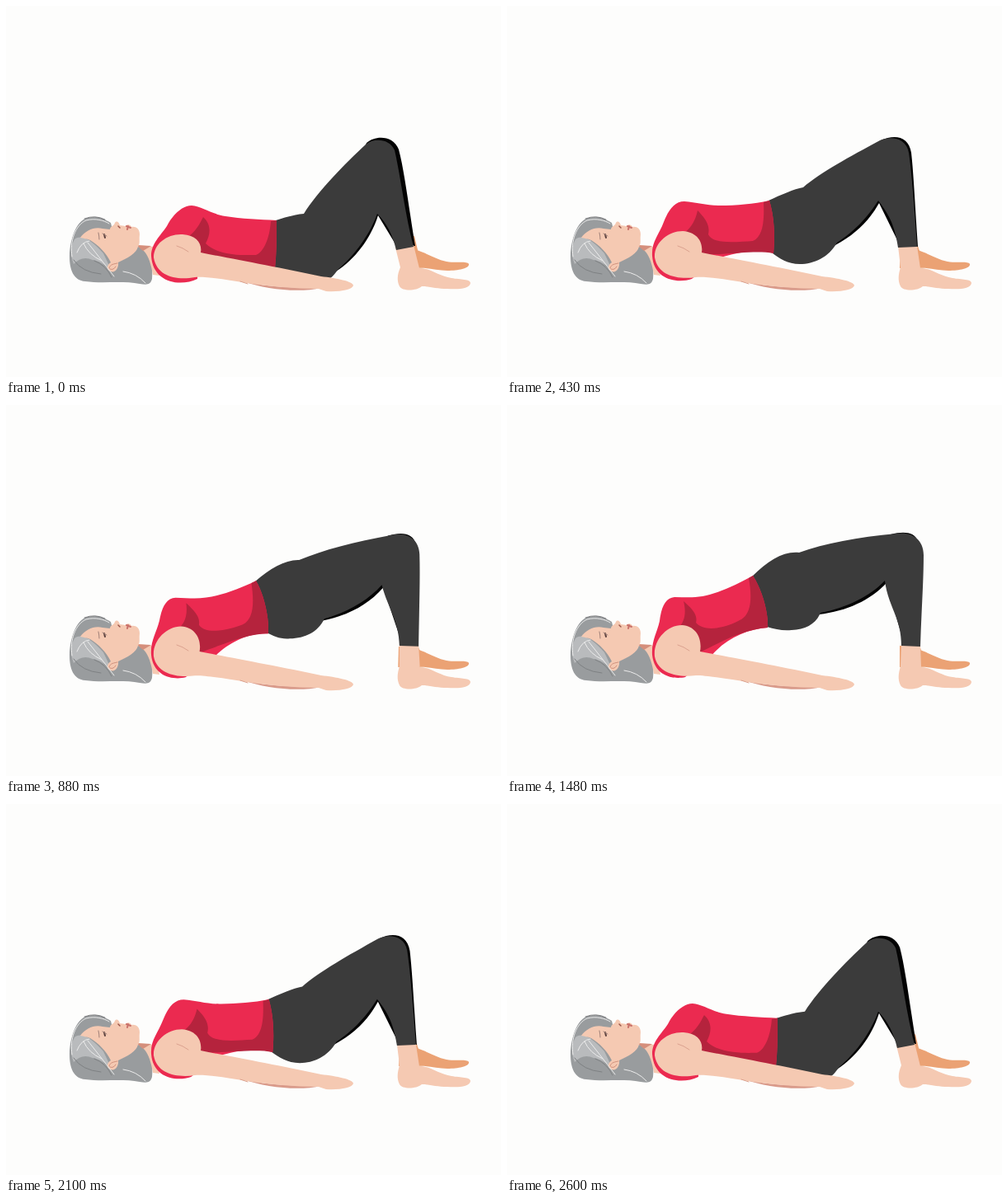
These frames come from a looping animation (600 by 450 pixels, 2.62 s). An HTML page:

```html
<!DOCTYPE html>
<html lang="en">
<head>
<meta charset="utf-8">
<title>Bridge exercise</title>
<style>
html, body { margin: 0; width: 100%; height: 100%; overflow: hidden; background: #fdfdfc; }
svg { display: block; width: 600px; height: 450px; }
.line { fill: none; stroke-linecap: round; }
</style>
</head>
<body>
<svg viewBox="0 0 600 450">
  <!-- far leg -->
  <g fill="#eba274">
    <path id="farAnkle"/>
    <path d="M497 296C507 298 520 307 534 310C546 312 559 309 561 313C562 318 549 321 535 321C522 321 511 317 499 318Z"/>
  </g>
  <path id="farLeg" fill="#030303"/>

  <!-- near leg -->
  <path id="foot" fill="#f5c9b2"/>
  <path id="pants" fill="#3b3b3b"/>

  <!-- hair and neck -->
  <path fill="#999c9e" d="M94 259C104 254 117 256 127 263L130 275L158 292L172 293C177 304 178 318 177 331C175 339 170 338 162 337C141 333 116 337 96 334C82 333 77 320 77 304C77 287 83 266 94 259Z"/>
  <path fill="#b9bbbd" d="M83 283C93 276 104 285 118 300L127 319C119 314 113 309 105 308C96 304 89 306 82 313C78 302 78 292 83 283Z"/>
  <path fill="#f5c9b2" d="M160 290L179 292L186 327L178 326C176 314 173 303 167 297Z"/>
  <path fill="#d58f7c" d="M158 290L176 291L166 297Z"/>

  <!-- torso -->
  <path id="top" fill="#eb2a50"/>
  <path id="shade" fill="#b5233d"/>

  <!-- arm -->
  <path fill="#d99a8a" d="M288 334C320 342 350 341 382 342C355 348 315 344 288 334Z"/>
  <path id="arm" fill="#f5c9b2"/>
  <path class="line" stroke="#dba28f" d="M207 291Q214 293 221 298M284 334L293 337"/>

  <!-- face -->
  <path fill="#f5c9b2" d="M90 281C96 272 108 267 117 270L126 271C126 267 131 267 132 263C134 260 137 262 138 266L145 267C147 264 151 265 152 268C157 267 162 270 162 277C161 284 163 287 160 292C158 300 147 306 136 311C137 318 132 324 127 322C121 320 122 314 127 311C122 300 112 290 102 284C97 282 94 282 90 281Z"/>
  <path class="line" stroke="#d0907c" d="M125 318C126 313 131 313 135 312M126 319Q130 321 133 316"/>
  <path class="line" stroke="#5f4440" stroke-width="2" d="M119 277L120 281"/>
  <path class="line" stroke="#a08078" d="M112 275Q113 279 113 283M117 276L122 279"/>
  <path class="line" stroke="#9a5548" stroke-width="1.5" d="M136 267L138 269"/>
  <path class="line" stroke="#c9706a" stroke-width="2" d="M146 267L151 269M148 267L147 271"/>
  <path class="line" stroke="#ececec" d="M80 304C77 285 84 266 97 260C108 257 119 260 125 264M86 299Q91 286 101 285M94 288Q100 302 116 309M99 287Q111 302 131 328M142 322Q158 324 169 336"/>
  <path class="line" stroke="#585a5c" stroke-width=".8" d="M95 258Q108 253 120 259"/>
  <path class="line" stroke="#7e8183" d="M82 308Q92 323 115 325M107 309Q121 314 128 329"/>
</svg>
<script>
// Each part has three poses: lying, half raised, raised.
const parts = {
  farAnkle: [
    "M480 279L495 279L500 300L500 318L482 318Z",
    "M477 291L498 291L501 300L501 318L476 318Z",
    "M476 292L500 292L503 300L502 318L476 318Z"
  ],
  farLeg: [
    "M437 166C447 157 469 156 476 174C483 200 489 250 496 291L474 292L451 254C442 283 422 308 400 322L380 300Z",
    "M453 163C470 155 487 158 490 178C493 205 495 250 498 292L476 290L451 239C438 262 422 277 398 290L380 270Z",
    "M465 157C481 153 494 154 498 165C500 200 500 255 500 285L480 285L460 216C440 237 412 250 378 254L370 230Z"
  ],
  foot: [
    "M472 293L494 290L501 318C515 318 525 328 540 330C551 332 563 331 563 336C562 343 549 344 535 343C522 343 514 340 504 340C497 346 480 346 477 340C473 332 475 324 478 317Z",
    "M474 291L497 291L501 318C515 318 525 328 540 330C551 332 563 331 563 336C562 343 549 344 535 343C522 343 514 340 504 340C497 346 480 346 477 340C473 332 475 324 477 317Z",
    "M478 290L501 291L502 318C515 318 525 328 540 330C551 332 563 331 563 336C562 343 549 344 535 343C522 343 514 340 504 340C497 346 480 346 477 340C473 332 475 324 477 317Z"
  ],
  pants: [
    "M327 260C340 256 350 253 361 252C378 225 410 192 437 167C447 160 465 161 471 175C478 205 484 255 494 292L473 296C468 275 460 262 450 252C440 280 420 305 403 319C397 327 394 331 390 331C370 328 345 324 325 318Z",
    "M317 236C332 229 348 222 359 220C380 202 415 183 452 163C466 157 484 160 487 178C491 205 494 250 497 292L474 293C470 266 463 253 450 236C436 258 420 274 400 287C390 305 372 313 355 313C340 313 330 306 322 300Z",
    "M297 208C316 189 335 177 354 179C385 168 425 160 472 156C488 153 505 161 505 182C505 215 502 255 501 293L478 292C478 258 462 245 458 213C440 232 412 246 380 252C374 266 362 272 345 273C334 274 325 272 315 269Z"
  ],
  top: [
    "M176 303C176 288 187 279 195 267C202 253 214 242 225 242C238 243 248 252 266 255C285 258 308 259 328 260C328 280 328 300 326 318C300 315 265 307 234 301L232 331C211 341 178 336 176 303Z",
    "M176 303C175 286 184 278 190 262C196 247 203 237 215 237C230 238 242 242 258 242C278 242 299 240 318 236C324 255 325 280 323 300C302 293 276 300 256 306L224 331C206 337 178 332 176 303Z",
    "M176 303C175 286 182 276 185 262C187 245 192 234 203 233C215 233 225 234 237 232C258 228 280 217 298 207C308 222 317 250 316 270C290 272 264 284 247 305L216 330C203 333 179 330 176 303Z"
  ],
  shade: [
    "M218 282C230 274 235 264 239 256C248 264 249 275 242 288C258 304 290 302 303 302C315 297 320 276 321 261L328 260C328 280 328 300 326 318C300 315 265 307 234 302Z",
    "M212 277C224 270 229 258 231 248C243 260 246 268 244 277C250 290 280 286 298 285C311 280 312 258 311 238L318 236C324 255 325 280 323 300C302 296 274 301 234 302Z",
    "M205 272C217 264 217 250 214 238C227 249 231 256 229 264C240 277 268 269 282 261C297 254 297 232 293 210L298 207C308 222 317 250 316 270C290 272 269 282 234 300Z"
  ],
  arm: [
    "M179 305C179 288 196 276 214 277C231 278 238 288 236 299C270 306 330 317 382 328C400 330 421 334 421 339C420 344 405 347 388 346L379 343C350 343 320 340 292 336C262 331 240 328 229 329C208 333 183 329 179 305Z",
    "M179 305C178 287 196 273 213 273C230 274 238 286 236 299C270 306 330 317 382 328C400 330 421 334 421 339C420 344 405 347 388 346L379 343C350 343 320 340 292 336C262 331 240 328 229 329C208 332 183 328 179 305Z",
    "M179 305C177 285 194 267 212 267C229 268 237 283 234 299C270 306 330 317 382 328C400 330 421 334 421 339C420 344 405 347 388 346L379 343C350 343 320 340 292 336C262 331 240 328 229 328C208 331 183 326 179 305Z"
  ]
};
const MID = 0.45, LOOP = 2620;
const lift = [[0, 0], [430, .45], [880, .88], [1265, 1.05], [1480, 1], [1730, .79], [2100, .43], [2560, .02], [LOOP, 0]];

const shapes = Object.entries(parts).map(([id, poses]) => ({
  node: document.getElementById(id),
  form: poses[0],
  values: poses.map(pose => pose.match(/\d+/g).map(Number))
}));

function slope(i) {
  const a = lift[Math.max(i - 1, 0)], b = lift[Math.min(i + 1, lift.length - 1)];
  return (b[1] - a[1]) / (b[0] - a[0]);
}

// Smooth curve through the lift keys.
function liftAt(t) {
  const i = lift.findIndex(key => key[0] > t) - 1;
  const [t0, a] = lift[i], [t1, b] = lift[i + 1];
  const span = t1 - t0, s = (t - t0) / span, r = 1 - s;
  return a * r * r * (1 + 2 * s) + b * s * s * (3 - 2 * s) +
    span * s * r * (slope(i) * r - slope(i + 1) * s);
}

function draw(now) {
  const u = liftAt(now % LOOP);
  const weights = [
    (u - MID) * (u - 1) / MID,
    u * (1 - u) / (MID * (1 - MID)),
    u * (u - MID) / (1 - MID)
  ];
  for (const { node, form, values } of shapes) {
    let i = 0;
    node.setAttribute("d", form.replace(/\d+/g, () => {
      const v = weights.reduce((sum, w, k) => sum + w * values[k][i], 0);
      i++;
      return v.toFixed(2);
    }));
  }
}

const start = performance.now();
function tick() {
  draw(performance.now() - start);
  requestAnimationFrame(tick);
}
tick();
</script>
</body>
</html>
```
